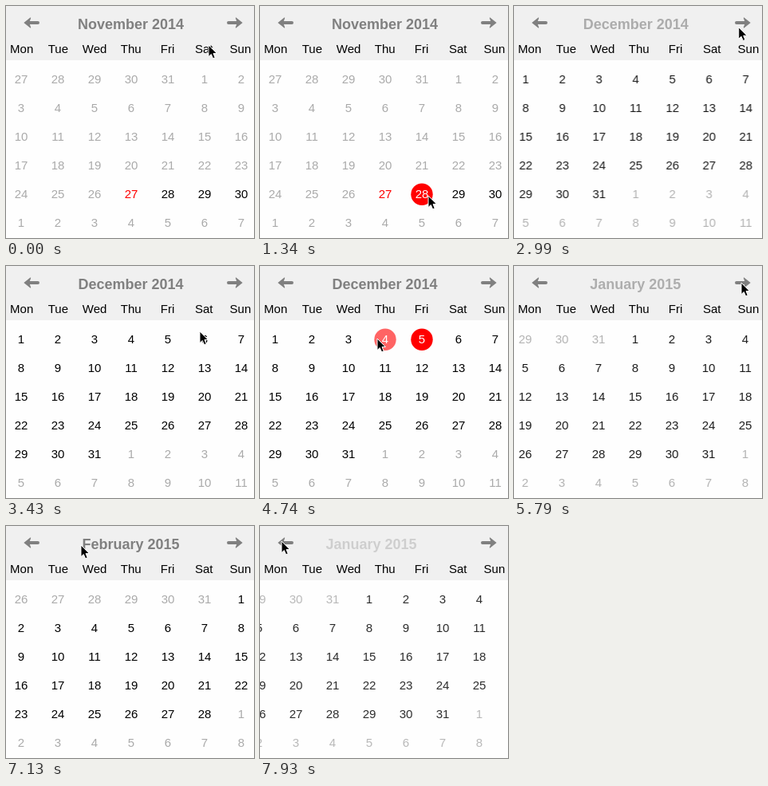
An HTML page for the animation above (8 s loop, 311 by 291 pixels).

```html
<!DOCTYPE html>
<html lang="en">
<head>
<meta charset="utf-8">
<title>Date picker</title>
<style>
  html, body { margin: 0; width: 311px; height: 291px; overflow: hidden; background: #fefefe; }
  svg { display: block; }
  text { font: 15px "Liberation Sans", Arial, sans-serif; text-anchor: middle; }
  #title { font-size: 18px; font-weight: bold; fill: #808080; }
</style>
</head>
<body>
<svg id="stage" width="311" height="291" viewBox="0 0 311 291">
  <rect width="311" height="291" fill="#fefefe"/>
  <rect width="311" height="68" fill="#f0f0f0"/>
  <defs>
    <path id="arrow" d="M22.3 21 L30.4 14.6 Q31.5 14.3 31.1 15.5 L29.8 19 H40 Q42 19 42 21 Q42 23 40 23 H29.8 L31.1 26.5 Q31.5 27.7 30.4 27.4Z"/>
  </defs>
  <use id="prev" href="#arrow"/>
  <use id="next" href="#arrow" transform="translate(319 0) scale(-1 1)"/>
  <text id="title" x="156.5" y="29"/>
  <g id="weekdays"></g>
  <g id="grid"></g>
  <path id="cursor" d="M0 0 V14.6 L3.3 11.5 L5.6 16.8 L8.2 15.7 L6 10.5 H10.4Z" fill="#000" stroke="#fff" stroke-width="1" stroke-linejoin="round"/>
</svg>
<script>
const LOOP = 8000;
const TODAY = Date.UTC(2014, 10, 27);
const DAY = 86400000;
const SLIDE = 300;
const MONTH_NAMES = { 0: 'January', 1: 'February', 10: 'November', 11: 'December' };

// side: -1 slides in from the left, 1 from the right
const views = [
  { at: -SLIDE, year: 2014, month: 10, side: 0 },
  { at: 2810, year: 2014, month: 11, side: -1 },
  { at: 5616, year: 2015, month: 0, side: -1 },
  { at: 6690, year: 2015, month: 1, side: 1 },
  { at: 7843, year: 2015, month: 0, side: -1 }
];
const picks = [
  { at: 1190, view: 0, cell: 32 },
  { at: 1890, view: 0, cell: 33 },
  { at: 3970, view: 1, cell: 4 },
  { at: 4650, view: 1, cell: 3 }
];
const presses = [
  { id: 'next', from: 2730, to: 2810 },
  { id: 'next', from: 5530, to: 5610 },
  { id: 'next', from: 6600, to: 6690 },
  { id: 'prev', from: 7670, to: 7843 }
];
// Cursor stops: time, x, y
const path = [
  [90, 254, 49], [960, 211, 239], [1080, 211, 238], [1340, 211, 238],
  [1780, 243, 236], [1960, 243, 236], [2560, 286, 27], [2730, 285, 22],
  [2900, 285, 22], [3430, 243, 82], [3600, 226, 91], [3770, 206, 90],
  [4040, 206, 90], [4380, 147, 91], [4780, 147, 91], [5480, 285, 21],
  [6680, 285, 21], [7130, 94, 24], [7400, 27, 19]
];

const $ = id => document.getElementById(id);
const clamp = v => Math.min(1, Math.max(0, v));

function add(parent, name, attrs, content = '') {
  const node = document.createElementNS('http://www.w3.org/2000/svg', name);
  for (const key in attrs) node.setAttribute(key, attrs[key]);
  node.textContent = content;
  return parent.appendChild(node);
}

['Mon', 'Tue', 'Wed', 'Thu', 'Fri', 'Sat', 'Sun'].forEach((name, i) =>
  add($('weekdays'), 'text', { x: 19.7 + 45.7 * i, y: 59 }, name));

const cells = Array.from({ length: 42 }, (_, i) => {
  const x = 19 + 46 * (i % 7), y = 92 + 36 * Math.floor(i / 7);
  const dot = add($('grid'), 'circle', { cx: x, cy: y + 0.2, r: 13.7, fill: '#f00', opacity: 0 });
  return { dot, label: add($('grid'), 'text', { x, y: y + 5 }) };
});

function cursorAt(t) {
  const i = path.findIndex(p => p[0] > t);
  if (i === 0) return path[0].slice(1);
  if (i < 0) return path[path.length - 1].slice(1);
  const [t0, x0, y0] = path[i - 1], [t1, x1, y1] = path[i];
  const u = (t - t0) / (t1 - t0), k = u * u * (3 - 2 * u);
  return [x0 + (x1 - x0) * k, y0 + (y1 - y0) * k];
}

function drawMonth(view) {
  const first = Date.UTC(view.year, view.month, 1);
  const start = first - (new Date(first).getUTCDay() + 6) % 7 * DAY;
  $('title').textContent = `${MONTH_NAMES[view.month]} ${view.year}`;
  cells.forEach(({ dot, label }, i) => {
    const time = start + i * DAY, date = new Date(time);
    const muted = time < TODAY || date.getUTCMonth() !== view.month;
    label.textContent = date.getUTCDate();
    label.setAttribute('fill', time === TODAY ? '#f00' : muted ? '#aaa' : '#000');
    dot.setAttribute('opacity', 0);
  });
}

let shown = -1;
function render(t) {
  const index = views.findLastIndex(v => t >= v.at);
  const view = views[index];
  if (index !== shown) drawMonth(views[shown = index]);

  const p = clamp((t - view.at) / SLIDE);
  const shift = view.side * 50 * (1 - p) ** 2.64;
  $('grid').setAttribute('transform', `translate(${shift} 0)`);
  $('grid').setAttribute('opacity', 0.78 + 0.22 * p);
  $('title').setAttribute('transform', `translate(${shift * 0.85} 0)`);
  $('title').setAttribute('opacity', p);

  for (const pick of picks) {
    if (pick.view !== index) continue;
    const { dot, label } = cells[pick.cell];
    const k = clamp((t - pick.at) / 150);
    dot.setAttribute('opacity', k);
    label.setAttribute('fill', k > 0 ? '#fff' : '#000');
  }

  for (const id of ['prev', 'next']) {
    const down = presses.some(b => b.id === id && t >= b.from && t < b.to);
    $(id).setAttribute('fill', down ? '#505050' : '#808080');
  }
  $('cursor').setAttribute('transform', `translate(${cursorAt(t).join(' ')})`);
}

const began = performance.now();
function tick() {
  render((performance.now() - began) % LOOP);
  requestAnimationFrame(tick);
}
tick();
</script>
</body>
</html>
```
